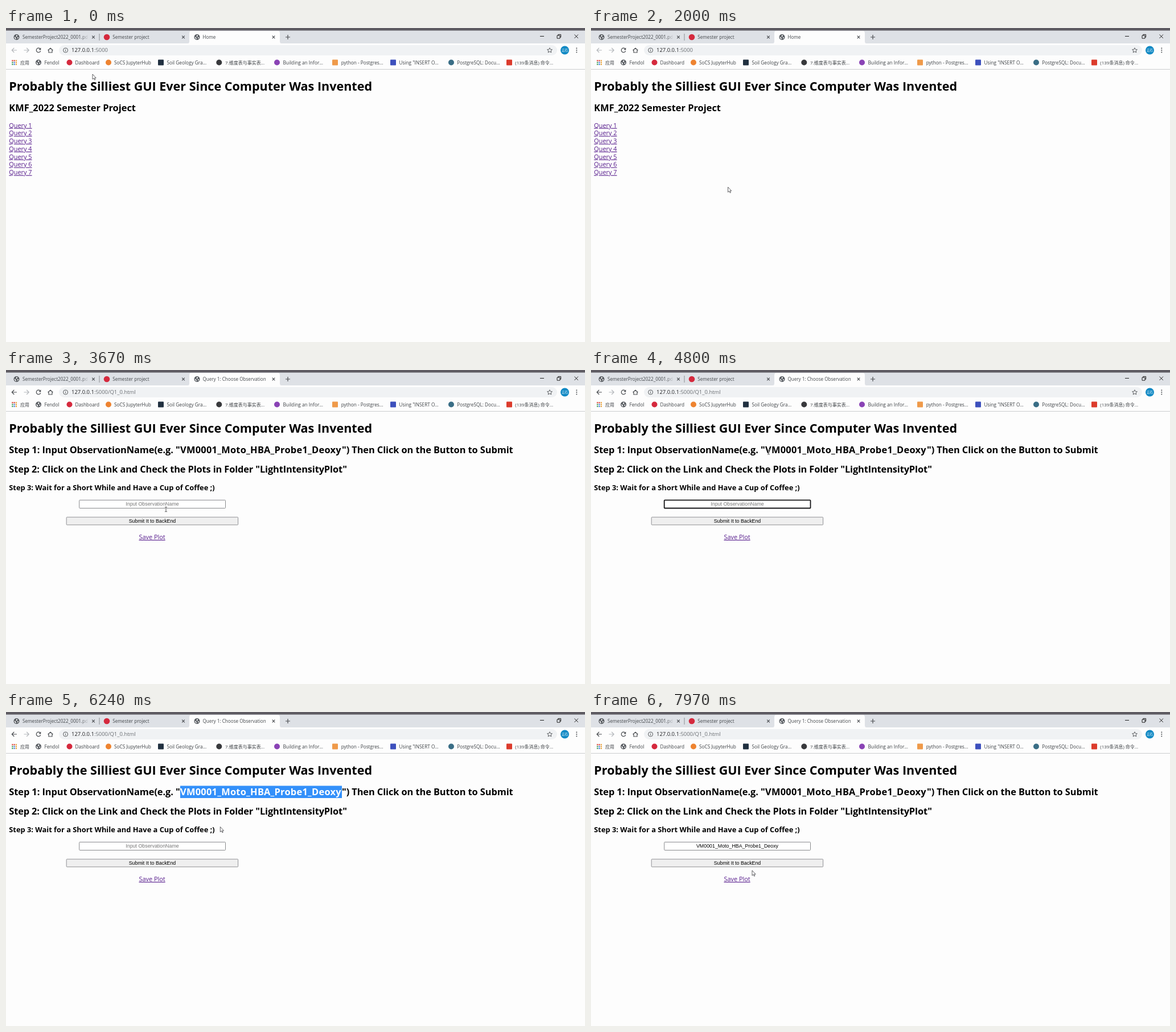
Animation, 1017 px wide and 551 px high, one loop 8000 ms. Source, as an HTML page:

```html
<!DOCTYPE html>
<html lang="en">
<head>
<meta charset="utf-8">
<title>Query page demo</title>
<style>
html, body { margin: 0; width: 100%; height: 100%; overflow: hidden; background: #fdfdfd; }
svg { display: block; }
text { font-family: "Open Sans", "Noto Sans CJK SC", "Noto Sans CJK", sans-serif; white-space: pre; }
.tab { font-size: 8.15px; fill: #45494d; }
.mark { font-size: 8.25px; fill: #3f4347; }
.cjk { font-size: 8px; }
.url { font-size: 9.45px; fill: #6a6e73; }
.host { fill: #202124; }
.h1 { font-size: 21.55px; font-weight: 700; }
.h2 { font-size: 16.4px; font-weight: 700; }
.h3 { font-size: 12.85px; font-weight: 700; }
.link { font-size: 10.9px; fill: #551a8b; text-decoration: underline; }
.form { font-family: "Liberation Sans", Arial, sans-serif; font-size: 8.85px; text-anchor: middle; }
.line { fill: none; stroke: #4a4d51; stroke-width: 1.2; }
.dim { stroke: #b4b7bb; }
</style>
</head>
<body>
<svg id="stage" width="1017" height="551" viewBox="0 0 1017 551"></svg>
<script>
const LOOP = 8000;
const LOAD_START = 2600, LOAD_END = 3070;
const SELECT_X = 306, SELECT_END = 590;

const text = (x, y, cls, str, spacing = 0) =>
  `<text x="${x}" y="${y}" class="${cls}"${spacing ? ` letter-spacing="${spacing}"` : ''}>${str}</text>`;
const rect = (x, y, w, h, fill, more = '') =>
  `<rect x="${x}" y="${y}" width="${w}" height="${h}" fill="${fill}" ${more}/>`;
const dot = (x, y, r, fill) => `<circle cx="${x}" cy="${y}" r="${r}" fill="${fill}"/>`;
const line = (d, more = '') => `<path class="line" d="${d}" ${more}/>`;
const group = (id, body) => `<g id="${id}">${body}</g>`;
const cross = (x, y, r) => line(`M${x - r} ${y - r}l${2 * r} ${2 * r}m0 ${-2 * r}l${-2 * r} ${2 * r}`);
const globe = (x, y) => dot(x, y, 5, '#55595e') +
  `<path transform="translate(${x} ${y})" fill="#f4f5f6" d="M-3.8-1L-1 1.2L-.6 3.9Q-3.6 3-3.8-1ZM-.4-3.8L1.8-3L1-1L-1.2-.6ZM1 .4L3.6 0Q3.4 2 2 3Z"/>`;

function windowFrame() {
  return rect(0, 0, 1017, 551, '#fdfdfd') +
    rect(0, 0, 1017, 28, '#dee1e6') + rect(0, 0, 1017, 4.5, '#5e5b62') +
    '<path d="M318 27.5Q322 27.5 322 23.5V9Q322 5 326 5H477Q481 5 481 9V23.5Q481 27.5 485 27.5Z" fill="#fdfdfd"/>' +
    rect(0, 27, 1017, 46, '#fdfdfd') +
    globe(18.5, 16) + text(29, 19, 'tab', 'SemesterProject2022_0001.pd') +
    rect(132, 9, 13, 14, 'url(#fade)') + rect(145, 9, 4, 14, '#dee1e6') +
    rect(163.5, 10, 1, 12, '#898d92') +
    dot(177, 16, 5.3, '#d5293d') + text(187.3, 19, 'tab', 'Semester project') +
    [153.5, 311.5, 470].map(x => cross(x, 16, 2.3)).join('') +
    line('M491 16h8M495 12v8') +
    line('M938 14.5h7M968 13.2h5v5h-5zM969.8 13v-1.6h4.8v4.8h-1.6', 'style="stroke:#222;stroke-width:1"') +
    line('M998.5 11.5l6.4 6.4m0-6.4l-6.4 6.4', 'style="stroke:#222;stroke-width:1"');
}

function toolbar() {
  return rect(93, 30, 875, 18, '#f0f2f4', 'rx="9"') +
    line('M19 39H10.5M14.3 35l-4 4l4 4', 'id="back"') +
    line('M31.5 39H40M36.2 35l4 4l-4 4', 'style="stroke:#b4b7bb"') +
    group('reload', line('M60.2 36.8A3.8 3.8 0 1 0 60.7 40.2') + '<path d="M61.3 34.6v3.8h-3.8z" fill="#4a4d51"/>') +
    group('stop', cross(57, 39, 3.4)) +
    line('M73.6 39.3L78 35.3L82.4 39.3M75 38.6V43H81V38.6') +
    line('M108.6 39a4 4 0 1 0-8 0a4 4 0 1 0 8 0M104.6 38.4v2.8M104.6 36.6v1', 'style="stroke-width:.9"') +
    line('M955 34.8l1.3 2.8l3.1 .3l-2.3 2.1l.7 3l-2.8-1.6l-2.8 1.6l.7-3l-2.3-2.1l3.1-.3z', 'style="stroke-width:.9"') +
    dot(981.5, 39, 7.5, '#1189c4') +
    '<text x="981.5" y="41.1" font-size="5.6" fill="#fff" text-anchor="middle">云石</text>' +
    [35.4, 39, 42.6].map(y => dot(1002.3, y, 1, '#4a4d51')).join('');
}

function bookmarks() {
  const colors = ['#dc4437', '#dc4437', '#e9a23b', '#43a05a', '#4a7fe0', '#e9a23b', '#43a05a', '#4a7fe0', '#e9a23b'];
  const apps = colors.map((c, i) => rect(10.3 + i % 3 * 3.3, 56.2 + Math.floor(i / 3) * 3.3, 2.2, 2.2, c)).join('');
  // icon x, label x, label, icon colour, shape
  const items = [
    [111.5, 121.5, 'Dashboard', '#d5293d', 'o'],
    [180, 190, 'SoCS JupyterHub', '#ee8330', 'o'],
    [272, 282.5, 'Soil Geology Gra...', '#213040', 's'],
    [374.3, 385, '7.维度表与事实表...', '#38393c', 'o'],
    [476, 486.5, 'Building an Infor...', '#8a43b5', 'o'],
    [578, 588.7, 'python - Postgres...', '#ef9a4a', 's'],
    [680, 690.5, 'Using "INSERT O...', '#3d50bd', 's'],
    [782, 792.3, 'PostgreSQL: Docu...', '#3a6e86', 'o'],
    [884, 894.3, '(139条消息) 命令...', '#dc3b2c', 's']
  ];
  return apps + text(25, 63.6, 'mark cjk', '应用') +
    globe(57, 60.5) + text(67.4, 63.6, 'mark', 'Fendol') +
    items.map(([ix, x, label, color, shape]) =>
      (shape === 'o' ? dot(ix, 60.5, 5, color) : rect(ix - 5, 55.5, 10, 10, color, 'rx="1"')) +
      text(x, 63.6, /[^\x00-\x7f]/.test(label) ? 'mark cjk' : 'mark', label)).join('') +
    rect(0, 72, 1017, 1, '#cbcccf');
}

function homePage() {
  return text(5.3, 146.4, 'h2', 'KMF_2022 Semester Project') +
    [...Array(7)].map((_, i) => text(5.3, 174.6 + i * 13.77, 'link', `Query ${i + 1}`)).join('');
}

function queryPage() {
  const sample = 'VM0001_Moto_HBA_Probe1_Deoxy';
  const sampleText = text(SELECT_X, 146.4, 'h2', sample, 0.27);
  return text(5.3, 146.4, 'h2', 'Step 1: Input ObservationName(e.g. "', -0.08) + sampleText +
    text(SELECT_END, 146.4, 'h2', '") Then Click on the Button to Submit', -0.09) +
    group('selection', '<g clip-path="url(#picked)">' +
      rect(SELECT_X, 129.5, 284, 21.5, '#3390fa') + `<g fill="#fff">${sampleText}</g></g>`) +
    text(5.3, 180.2, 'h2', 'Step 2: Click on the Link and Check the Plots in Folder "LightIntensityPlot"', -0.13) +
    text(5.3, 211.4, 'h3', 'Step 3: Wait for a Short While and Have a Cup of Coffee ;)') +
    rect(128.7, 228.3, 256.8, 14.2, '#fff', 'id="field" rx="1"') +
    `<g id="hint" fill="#767676">${text(257, 238.3, 'form', 'Input ObservationName')}</g>` +
    group('typed', text(257, 238.3, 'form', sample)) +
    rect(106.2, 258.2, 301.4, 13.6, '#efefef', 'id="button" rx="1" stroke="#85868a" stroke-width=".9"') +
    text(257, 268, 'form', 'Submit It to BackEnd') +
    text(233.5, 297, 'link', 'Save Plot');
}

const cursors = group('arrow', '<path d="M0 0V9L2.1 7.2L3.6 10.2L4.9 9.6L3.5 6.7H6.2Z" fill="#fff" stroke="#3a3a3e" stroke-width=".8"/>') +
  group('hand', '<path d="M-1 5V-.5Q0-1.6 1-.5V3L5 4Q6 4.3 5.8 6L5 10H-.2L-3.2 6Q-3-4.8-1 6Z" transform="scale(.95)" fill="#fff" stroke="#3a3a3e" stroke-width=".8"/>'.replace('Q-3-4.8-1 6', 'Q-2.6 4.4-1 6')) +
  group('beam', line('M-2-4.2Q0-4.4 0-3.2Q0-4.4 2-4.2M0-3.2V3.2M-2 4.2Q0 4.4 0 3.2Q0 4.4 2 4.2', 'style="stroke:#fff;stroke-width:1.8;opacity:.7"') +
    line('M-2-4.2Q0-4.4 0-3.2Q0-4.4 2-4.2M0-3.2V3.2M-2 4.2Q0 4.4 0 3.2Q0 4.4 2 4.2', 'style="stroke:#444;stroke-width:.9"'));

document.getElementById('stage').innerHTML =
  '<defs><linearGradient id="fade"><stop stop-color="#dee1e6" stop-opacity="0"/><stop offset="1" stop-color="#dee1e6"/></linearGradient>' +
  `<clipPath id="picked"><rect id="range" x="${SELECT_X}" y="127" width="0" height="26"/></clipPath></defs>` +
  windowFrame() +
  group('icon', globe(335.5, 16)) + '<text id="title" x="345.4" y="19" class="tab"></text>' +
  toolbar() +
  '<text x="115" y="42.4" class="url"><tspan class="host">127.0.0.1</tspan>:5000<tspan id="path"></tspan></text>' +
  bookmarks() +
  text(5.3, 109.8, 'h1', 'Probably the Silliest GUI Ever Since Computer Was Invented') +
  group('home', homePage()) + group('query', queryPage()) + group('pointer', cursors);

// time, x, y of the pointer
const path = [
  [30, 152, 81], [430, 425, 277], [900, 425, 277], [1700, 350, 335], [1730, 350, 335],
  [2530, 27, 170], [3100, 27, 170], [3670, 281, 244.5], [3800, 280, 242.5], [4470, 280, 242.5],
  [4800, 312, 144], [4970, SELECT_X, 144], [5600, SELECT_END, 144], [6100, SELECT_END, 146],
  [6240, 376.8, 201.3], [6440, 282, 240], [7240, 282, 240], [7700, 281, 265],
  [7870, 281, 265], [7970, 283, 278]
];
const shapes = [
  [0, 'arrow'], [2440, 'hand'], [LOAD_END, 'arrow'], [3580, 'beam'], [4520, 'arrow'],
  [4700, 'beam'], [6130, 'arrow'], [6360, 'beam'], [7330, 'arrow']
];

const $ = id => document.getElementById(id);
const show = (id, on) => { $(id).style.display = on ? '' : 'none'; };
const within = (t, a, b) => t >= a && t < b;

function pointerAt(t) {
  const i = path.findIndex(p => p[0] > t);
  if (i === 0) return path[0].slice(1);
  if (i < 0) return path[path.length - 1].slice(1);
  const [t0, x0, y0] = path[i - 1], [t1, x1, y1] = path[i];
  const k = (t - t0) / (t1 - t0);
  return [x0 + (x1 - x0) * k, y0 + (y1 - y0) * k];
}

function render(t) {
  const left = t >= LOAD_START, loading = within(t, LOAD_START, LOAD_END), loaded = t >= LOAD_END;
  show('home', !loaded);
  show('query', loaded);
  show('icon', !loading);
  show('stop', loading);
  show('reload', !loading);
  $('back').classList.toggle('dim', !left);
  $('path').textContent = left ? '/Q1_0.html' : '';
  $('title').textContent = loaded ? 'Query 1: Choose Observation' : loading ? '127.0.0.1:5000/Q1_0.html' : 'Home';

  const [x, y] = pointerAt(t);
  const shape = shapes.filter(s => s[0] <= t).pop()[1];
  for (const id of ['arrow', 'hand', 'beam']) show(id, id === shape);
  $('pointer').setAttribute('transform', `translate(${x} ${y})`);

  const picked = t < 5600 ? x - SELECT_X : SELECT_END - SELECT_X;
  show('selection', within(t, 4970, 6670));
  $('range').setAttribute('width', Math.max(0, picked));

  const focused = within(t, 4270, 4970) || within(t, 6670, 7680);
  $('field').setAttribute('stroke', focused ? '#151517' : '#7c7d80');
  $('field').setAttribute('stroke-width', focused ? 1.8 : 0.9);
  show('hint', t < 6970);
  show('typed', t >= 6970);
  $('button').setAttribute('fill', within(t, 7500, 7930) ? '#e5e5e5' : '#efefef');
}

const start = performance.now();
function tick() {
  render((performance.now() - start) % LOOP);
  requestAnimationFrame(tick);
}
tick();
</script>
</body>
</html>
```
